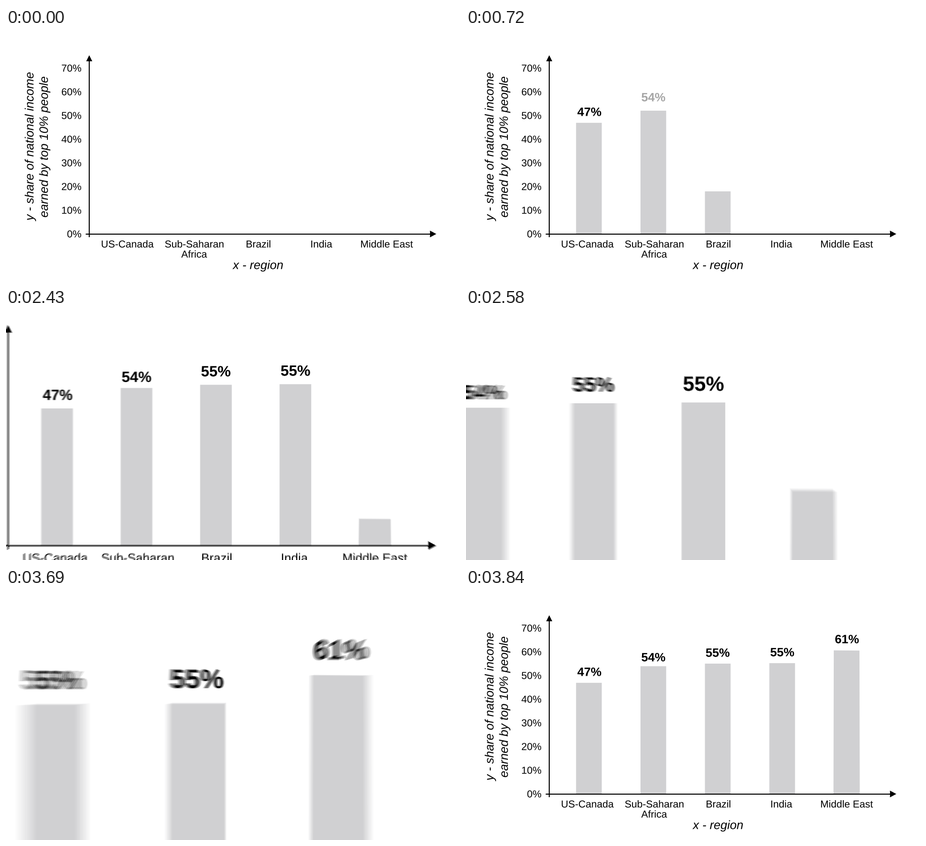
Animation of 900 by 500 pixels, one loop 7.2 s. Source, as a matplotlib script:

```python
import numpy as np
import matplotlib.pyplot as plt
from matplotlib.animation import FuncAnimation
from matplotlib.patches import PathPatch, Polygon
from matplotlib.path import Path
from matplotlib.textpath import TextPath

W, H, DPI = 900, 500, 100
STEP, LOOP = 30, 7200
BASE, UNIT = 409, 4.7  # y of 0 %, pixels per percent
BAR_W, BAR_X0, PITCH = 50.9, 218.2, 127.72
GRAY = "#d0d0d2"

# Bars: label, height in %, label centre, label baseline, growth start, fade start
BARS = [
    ("47%", 47.0, 244.5, 174.5, 0, 385),
    ("54%", 54.0, 371.5, 145.5, 261, 646),
    ("55%", 55.1, 499.0, 136.5, 522, 907),
    ("55%", 55.3, 627.0, 135.5, 783, 1168),
    ("61%", 60.65, 755.3, 109.6, 2303, 2608),
]
GROW, FADE = 517, 212

# Camera: centre x, centre y, view size relative to the stage
REST = np.array([450, 250, 1])
NEAR = np.array([523.1, 230.9, 0.8196])
CLOSE = np.array([755.8, 116.4, 0.2294])
CUT, ZOOM_END, BACK, BACK_END = 2430, 2820, 3480, 3840
BACK_POWER = np.array([1.82, 1.82, 1.92])
SHUTTER, SAMPLES = 12, 14
BLUR_X, BLUR_Y = 490, 190


def ease(x):
    x = np.clip(x, 0, 1)
    return x * x * (3 - 2 * x)


def camera(t):
    if t < CUT or t >= BACK_END:
        return REST
    if t < BACK:
        return NEAR + (CLOSE - NEAR) * ease((t - CUT + 30) / (ZOOM_END - CUT + 30))
    x = (t - BACK) / (BACK_END - BACK)
    return CLOSE + (REST - CLOSE) * ease(x ** BACK_POWER)


def motion_blur(spread):
    """Radial blur as an average of slightly scaled copies."""
    scales = np.exp(np.linspace(-0.5, 0.5, SAMPLES) * spread)

    def smear(img, dpi):
        img = img.astype(np.float32)
        h, w = img.shape[:2]
        total = np.zeros_like(img)
        for s in scales:
            rows = np.rint(BLUR_Y + (np.arange(h) - BLUR_Y) * s).astype(int)
            cols = np.rint(BLUR_X + (np.arange(w) - BLUR_X) * s).astype(int)
            part = img.take(rows.clip(0, h - 1), axis=0)
            total += part.take(cols.clip(0, w - 1), axis=1)
        return total / SAMPLES + 0.5 / 255, 0, 0

    return smear


fig = plt.figure(figsize=(W / DPI, H / DPI), dpi=DPI, facecolor="white")
ax = fig.add_axes([0, 0, 1, 1], facecolor="white")
ax.set(xticks=[], yticks=[])
ax.spines[:].set_visible(False)


def label(text, x, y, size, align="center", upright=True, **font):
    """Text as an outline, placed by its ink; y is the baseline."""
    path = TextPath((0, 0), text, size=size, prop=dict(family="Liberation Sans", **font))
    box = path.get_extents()
    anchor = box.x1 if align == "right" else (box.x0 + box.x1) / 2
    u, v = path.vertices[:, 0] - anchor, path.vertices[:, 1]
    verts = np.column_stack([x + u, y - v] if upright else [x - v, y - u])
    return ax.add_patch(PathPatch(Path(verts, path.codes), fc="black", lw=0, zorder=3))


def shape(points, color="black", z=2):
    return ax.add_patch(Polygon(points, closed=True, fc=color, lw=0, zorder=z, snap=False))


# Axes with arrow heads
shape([(164, 62), (166, 62), (166, 415), (164, 415)])
shape([(165, 54), (171, 66), (159, 66)])
shape([(158, 408), (844, 408), (844, 410), (158, 410)])
shape([(853, 408.7), (840.5, 402), (840.5, 415.4)])

for k in range(8):
    label(f"{10 * k}%", 149, 415.5 - 47 * k, 20, "right")

for name, x, y in [
    ("US-Canada", 241.3, 435.5),
    ("Sub-Saharan", 373.3, 435.5),
    ("Africa", 373, 455.5),
    ("Brazil", 500.5, 435.5),
    ("India", 626, 435.5),
    ("Middle East", 755.3, 435.5),
]:
    label(name, x, y, 20)

label("x - region", 498.8, 478.3, 24, style="italic")
label("y - share of national income", 54.5, 235.8, 24, upright=False, style="italic")
label("earned by top 10% people", 83, 236, 24, upright=False, style="italic")

bars = [shape(np.zeros((4, 2)), GRAY, 1) for _ in BARS]
values = [label(b[0], b[2], b[3], 24, weight="bold") for b in BARS]


def bar_points(i, height):
    x0 = BAR_X0 + PITCH * i
    x1 = x0 + BAR_W
    top = BASE - height
    skew = 0.2 if i == 4 else 0  # the last bar is drawn a little uneven
    return [(x0 - 3 * skew, BASE), (x0, top - skew), (x1, top + skew), (x1 + 3 * skew, BASE)]


def update(n):
    t = n * STEP
    for i, (_, percent, _, _, start, fade) in enumerate(BARS):
        shown = i < 4 or t >= CUT
        bars[i].set_visible(shown and t > start)
        bars[i].set_xy(bar_points(i, percent * UNIT * ease((t - start) / GROW)))
        values[i].set_alpha(float(np.clip((t - fade) / FADE, 0, 1)))

    cx, cy, size = camera(t)
    ax.set_xlim(cx - W / 2 * size, cx + W / 2 * size)
    ax.set_ylim(cy + H / 2 * size, cy - H / 2 * size)

    spread = 0
    if CUT <= t < BACK_END:
        spread = abs(np.log(camera(t + SHUTTER)[2] / size))
    ax.set_agg_filter(motion_blur(spread) if spread > 0.002 else None)
    return []


anim = FuncAnimation(fig, update, frames=LOOP // STEP, interval=STEP, repeat=True, blit=False)
plt.show()
```
